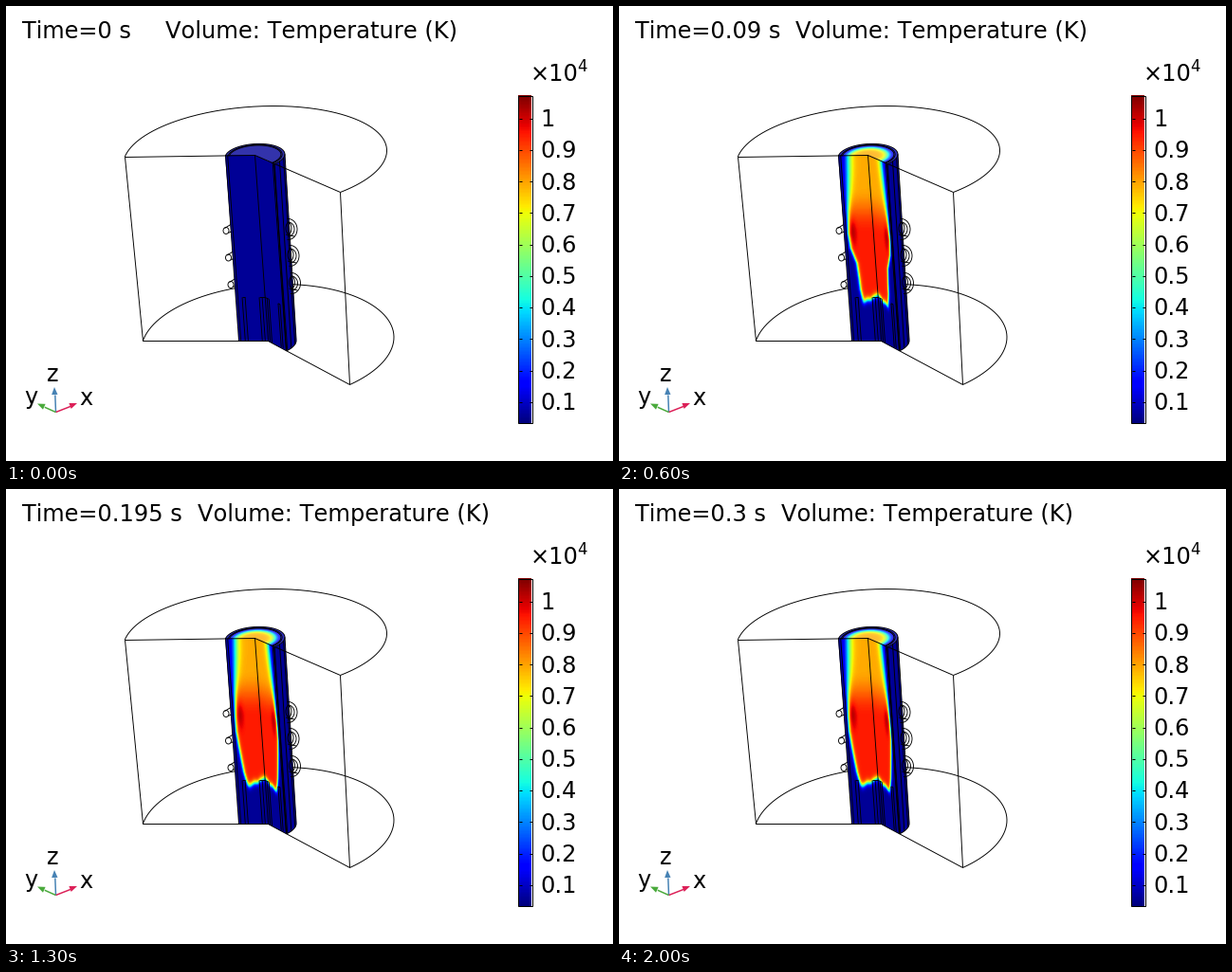
Write a matplotlib script that moves like this. It is 640 by 480 pixels and loops after 2.1 s.

```python
import numpy as np
import matplotlib.pyplot as plt
from matplotlib.animation import FuncAnimation
from matplotlib.patches import Arc, Ellipse, Polygon, Rectangle

W, H, DPI = 640, 480, 100
STEPS, STEP_MS, DT = 21, 100, 0.015
PX = 72 / DPI
AMBIENT = 0.02

plt.rcParams["font.family"] = "DejaVu Sans"
plt.rcParams["text.kerning_factor"] = 6
jet = plt.get_cmap("jet")

fig = plt.figure(figsize=(W / DPI, H / DPI), dpi=DPI, facecolor="white")
ax = fig.add_axes([0, 0, 1, 1])


def line(pts, z=5, color="black", lw=0.95):
    x, y = np.transpose(pts)
    ax.plot(x + 0.5, y + 0.5, color=color, lw=lw * PX, zorder=z,
            solid_capstyle="butt")


def label(x, y, s, size=24.0):
    return ax.text(x, y, s, fontsize=size * PX, color="black", zorder=9)


def oval(e, t, k=1.0):
    """Point(s) on a sheared ellipse e = (cx, cy, p, q, r), scaled by k."""
    cx, cy, p, q, r = e
    return np.stack([cx + k * p * np.cos(t),
                     cy + k * q * (r * np.cos(t) + np.sqrt(1 - r * r) * np.sin(t))], -1)


def oval_angle(e, x, y):
    cx, cy, p, q, r = e
    u = (x - cx) / p
    return np.arctan2(((y - cy) / q - r * u) / np.sqrt(1 - r * r), u)


# Outer domain
TOP_BIG = (262, 159.7, 139, 54.7, -0.1405)
LOW_BIG = (275.3, 356, 133.2, 63.06, -0.112)
TOP = (262, 157.6, 31.5, 12.8, -0.14)
LOW = (275.4, 353.7, 30.2, 14.3, -0.112)
T0, T1 = (262, 157), (276, 353)
LEFT, FRONT = [(125, 159), (144, 353)], [(352, 196), (362, 399)]

for e, a, b in zip((TOP_BIG, LOW_BIG), LEFT, FRONT):
    t = np.linspace(oval_angle(e, *a), oval_angle(e, *b), 160)
    line(oval(e, t), z=1)
line(LEFT, z=1)
line(FRONT, z=6)
for c, a, b in zip((T0, T1), LEFT, FRONT):
    line([a, c, b], z=6)

# Coil turns
for cx, cy in ((232, 237), (234.5, 265.5), (237, 294)):
    ax.add_patch(Ellipse((cx, cy), 6, 7, fill=False, lw=0.9 * PX, zorder=2))
    line([(cx - 2, cy - 3), (cx + 6, cy - 8)], z=2)
    line([(cx + 2, cy + 2), (cx + 9, cy - 2)], z=2)
for cx, cy in ((297.5, 235.5), (299.5, 263.5), (301, 292.5)):
    for w, h in ((19, 22), (13, 15)):
        ax.add_patch(Arc((cx, cy), w, h, theta1=-95, theta2=95,
                         lw=0.9 * PX, zorder=4))
    ax.add_patch(Ellipse((cx + 0.5, cy - 1), 6, 12, fill=False,
                         lw=0.9 * PX, zorder=4))
    line([(cx - 3, cy + 5), (cx + 6, cy + 7)], z=4)

# Torch body
front = oval_angle(TOP, 282.2, 166.4)
rim = oval(TOP, np.linspace(front, 0, 20))
foot = oval(LOW, np.linspace(0, 0.857, 20))
outline = np.vstack([[(230.5, 157), T0], rim, foot, [T1, (245.5, 353)]])
ax.add_patch(Polygon(outline + 0.5, fc=jet(AMBIENT), ec="none", zorder=3))

ring = np.linspace(-np.pi + 0.14, front, 90)
for k in (1, 0.91, 0.87):
    line(oval(TOP, ring, k), z=5, lw=0.9)
line(foot)
for t in (0, 0.3, 0.6, 0.857):
    line([oval(TOP, t), oval(LOW, t)])


def face(s, h, right):
    dx, dy = (20.2, 9.4) if right else (-31, 0)
    return 262 + 14 * h + dx * s, 157 + 196 * h + dy * s


def seam(s, h0=0.0, right=False):
    line([face(s, h0, right), face(s, 1, right)], lw=0.9)


seam(0)
for s in (1, 0.93):
    seam(s)
    seam(s, right=True)
for s in (0.1, 0.2, 0.68, 0.78):
    seam(s, 0.765)
    seam(s, 0.765, True)
for a, b in ((0, 0.2), (0.68, 0.78)):
    for right in (False, True):
        line([face(a, 0.765, right), face(b, 0.765, right)], lw=0.9)

# Cut faces and top disc mapped to radius s and depth h
X0, X1, Y0, Y1 = 226, 310, 140, 370
px, py = np.meshgrid(np.arange(X0, X1), np.arange(Y0, Y1))
dx, dy = px - 262.0, py - 157.0
h_left = dy / 196
s_left = (14 * h_left - dx) / 31
det = 14 * 9.4 - 20.2 * 196
h_right = (9.4 * dx - 20.2 * dy) / det
s_right = (14 * dy - 196 * dx) / det
u, v = dx / TOP[2], (py - TOP[1]) / TOP[3]
s_top = np.sqrt((u * u + v * v - 2 * TOP[4] * u * v) / (1 - TOP[4] ** 2))

on_left = (s_left >= 0) & (s_left <= 1) & (h_left >= 0) & (h_left <= 1)
on_right = (s_right > 0) & (s_right <= 1) & (h_right >= 0) & (h_right <= 1)
on_top = (s_top <= 1) & (dy < np.where(dx > 0, dx * 9.4 / 20.2, 0))
S = np.select([on_left, on_right, on_top], [s_left, s_right, s_top], 1.0)
D = np.select([on_left, on_right], [h_left, h_right], 0.0)
shown = on_left | on_right | on_top

# Plasma radius by depth at key steps
DEPTH = [0, 0.1, 0.2, 0.3, 0.42, 0.5, 0.58, 0.66, 0.72, 0.78]
KEYS = [1, 2, 4, 6, 9]
RADIUS = np.array([
    [-0.4, -0.2, 0.2, 0.6, 0.8, 0.72, 0.5, 0.15, -0.2, -0.4],
    [0.4, 0.55, 0.7, 0.8, 0.85, 0.78, 0.55, 0.25, -0.1, -0.4],
    [0.67, 0.72, 0.77, 0.82, 0.86, 0.8, 0.6, 0.36, 0.1, -0.3],
    [0.68, 0.72, 0.77, 0.82, 0.86, 0.81, 0.64, 0.6, 0.58, 0.52],
    [0.68, 0.72, 0.77, 0.82, 0.86, 0.86, 0.81, 0.75, 0.7, 0.62],
])


def smooth(a, b, x):
    x = np.clip((x - a) / (b - a), 0, 1)
    return x * x * (3 - 2 * x)


def sigmoid(x):
    return 1 / (1 + np.exp(-np.clip(x, -40, 40)))


def temperature(i):
    if i == 0:
        return np.full(S.shape, AMBIENT)
    now = [np.interp(i, KEYS, col) for col in RADIUS.T]
    edge = np.interp(D, DEPTH, now)
    width = 0.08 - 0.05 * smooth(0.05, 0.42, D)
    core = 0.73 + 0.15 * smooth(0.17, 0.42, D)
    core = core + 0.07 * np.exp(-((S - 0.7) / 0.12) ** 2 - ((D - 0.41) / 0.07) ** 2)
    floor = 0.785 - 0.035 * np.exp(-(S / 0.22) ** 4) + 0.008 * np.sin(14 * S)
    hot = sigmoid((edge - S) / width) * sigmoid((floor - D) / 0.009)
    return AMBIENT + (core - AMBIENT) * hot


def paint(i):
    rgba = jet(temperature(i))
    rgba[on_top, :3] = 0.8 * rgba[on_top, :3] + 0.2
    rgba[..., 3] = shown
    return rgba


field = ax.imshow(paint(0), extent=(X0, X1, Y1, Y0), interpolation="nearest",
                  zorder=4, aspect="auto")

# Colour bar
ax.imshow(np.linspace(1, 0, 346)[:, None], cmap=jet, extent=(540, 554, 440, 94),
          aspect="auto", zorder=4)
ax.add_patch(Rectangle((539.5, 94.5), 15, 345.5, fill=False, lw=PX, zorder=5))
for n in range(1, 11):
    y = 417.2 - 33.2 * (n - 1)
    line([(540, y), (543, y)])
    line([(551, y), (554, y)])
    label(563, y + 8.8, f"{n / 10:g}")
label(553, 79, "×10")
label(602, 69, "4", 16.5)

# Axis triad
HUB = np.array([52, 428])
for tip, color in (((51, 402), "#4682b4"), ((75, 419), "#dc2058"), ((33, 419.5), "#4aaa3c")):
    d = np.subtract(tip, HUB)
    d = d / np.hypot(*d)
    base = np.array(tip) - 8 * d
    side = 3.2 * np.array([-d[1], d[0]])
    line([HUB, base], color=color, lw=1.5)
    ax.add_patch(Polygon([tip, base + side, base - side], fc=color, ec="none", zorder=6))
label(43, 396, "z")
label(19, 420, "y")
label(77, 421, "x")

clock = label(17, 34, "")
caption = label(168, 34, "Volume: Temperature (K)", 24.1)

ax.set_xlim(0, W)
ax.set_ylim(H, 0)
ax.axis("off")


def update(i):
    num = f"{DT * i:.3f}".rstrip("0").rstrip(".")
    clock.set_text(f"Time={num} s")
    caption.set_x(167.5 if i == 0 else 171 + 15.3 * (len(num) - 3))
    field.set_data(paint(i))
    return clock, caption, field


anim = FuncAnimation(fig, update, frames=STEPS, interval=STEP_MS, repeat=True, blit=False)
plt.show()
```
